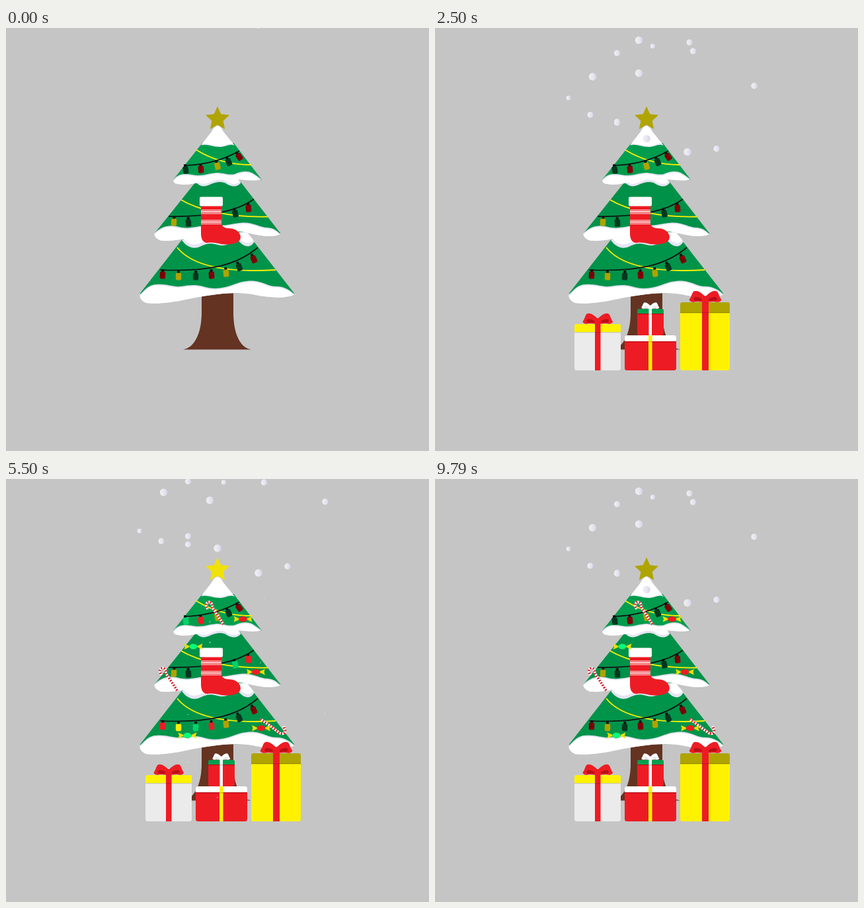
An HTML page with a canvas for the animation above (9870 ms loop, 640x640 px).

```html
<!DOCTYPE html>
<html lang="en">
<head>
<meta charset="utf-8">
<title>Christmas tree</title>
<style>
html, body { margin: 0; width: 100%; height: 100%; overflow: hidden; background: #c5c5c5; }
canvas { display: block; }
</style>
</head>
<body>
<canvas id="stage" width="640" height="640"></canvas>
<script>
const ctx = document.getElementById('stage').getContext('2d');
const LOOP = 9870, FPS = 14, LAST = 137;
const RED = '#ed1c24', DARK_RED = '#b90f16', YELLOW = '#fff200', OLIVE = '#b0a400';
const SHADE = '#e4e5f2';

// helpers
function fill(path, color) {
  ctx.fillStyle = color;
  ctx.fill(new Path2D(path));
}
function stroke(path, color, width, dash = []) {
  ctx.strokeStyle = color;
  ctx.lineWidth = width;
  ctx.setLineDash(dash);
  ctx.stroke(new Path2D(path));
  ctx.setLineDash([]);
}
function box(x, y, w, h, color, radius = 0) {
  ctx.fillStyle = color;
  ctx.beginPath();
  ctx.roundRect(x, y, w, h, radius);
  ctx.fill();
}
function at(x, y, draw, angle = 0) {
  ctx.save();
  ctx.translate(x, y);
  ctx.rotate(angle * Math.PI / 180);
  draw();
  ctx.restore();
}
function mix(a, b, k) {
  return `rgb(${a.map((v, i) => Math.round(v + (b[i] - v) * k)).join(',')})`;
}

// remaining share of a drop, slow start and long soft landing
function remaining(x) {
  if (x <= 0) return 1;
  if (x >= 1) return 0;
  let lo = 0, hi = 1;
  for (let i = 0; i < 24; i++) {
    const t = (lo + hi) / 2, u = 1 - t;
    if (1.5 * u * u * t + t * t * t < x) lo = t; else hi = t;
  }
  const u = 1 - lo;
  return u * u * (3 - 2 * u);
}

// brightness of the blinking lights: [second, level]
const GLOW = [[0, 0], [4, 0], [5.5, 1], [7, 0], [8.8, 1], [9.78, 0], [10, 0]];
function glowAt(s) {
  const i = GLOW.findIndex(k => k[0] > s);
  const [a, p] = GLOW[i - 1], [b, q] = GLOW[i];
  return p + (q - p) * (s - a) / (b - a);
}

// white snow with a shaded rim on the side given by the shift
function snow(path, shift) {
  fill(path, SHADE);
  ctx.save();
  ctx.clip(new Path2D(path));
  ctx.translate(0, shift);
  fill(path, '#fff');
  ctx.restore();
}

function tree() {
  fill('M296 396V430C296 464 284 484 268 486.500H371C355 484 344 464 344 430V396Z', '#643322');

  fill('M268 318L202.500 402Q320 400 436.500 402L371 318Z', '#00944a');
  snow('M266 321C274 332 284 335 293 331C303 326 309 325 320 328C334 332 344 322 352 322C358 329 368 336 376 323L362 306L280 310Z', -5);
  snow('M202 404C210 396 216 388 228 388C244 387 252 392 264 391C278 389 286 388 298 391C314 396 328 394 342 389C354 384 364 382 374 382.500C390 384 396 391 410 391C421 391 430 397 436.500 403C424 410 398 408 378 404C346 397 308 404 276 410C250 416 226 418 212 416C205 413 203 409 202 404Z', 2);

  fill('M288.500 231L224.500 311Q320 306 415.500 311L353.500 231Z', '#009148');
  snow('M287 233C292 239 298 241 306 238C318 233 326 231 334 236C342 241 350 241 355.500 234L348 225L294 226Z', -3.5);
  snow('M224 311C236 299 248 297 262 301C278 305 290 299 304 299C326 301 342 296 358 294.500C376 294 384 302 396 302C406 303 410 307 415.500 312C404 317 386 315 370 311C346 304 320 309 296 313C270 320 250 323 234 321.500C228 319 225 316 224 311Z', 2);

  fill('M297 174L253 229.500Q320 224 387 229.500L344.500 174Z', '#009b4c');
  fill('M296 177L278 200Q320 226 372 218L350 190Q320 205 296 177Z', '#00a04f');
  snow('M253 230C260 220 270 220 282 222C296 225 306 220 318 219C330 219 336 223 346 221C356 216 366 216 372 219C378 222 382 226 386.500 229C374 232 360 230 346 228C322 225 304 232 286 235C272 238 262 237 256 235Q253 233 253 230Z', 2);
  snow('M311 157Q320 139 329 157L346 178C338 174 333 180 323 180C312 180 305 175 295 177.500Z', -1.5);
}

function garlands() {
  stroke('M288 184.500C310 198 335 207 371 207', YELLOW, 1.8);
  stroke('M270 208C302 207 330 199 353 186', '#111', 1.7);
  stroke('M265 260C290 275 338 287 396 285.500', YELLOW, 1.8);
  stroke('M246 285C300 286 346 280 375 259', '#111', 1.7);
  stroke('M259 332C280 358 325 371 408 366', YELLOW, 1.8);
  stroke('M233 366C305 369 348 360 381 332', '#111', 1.7);
}

const LIGHT = {
  r: [[124, 0, 8], [237, 28, 36]],
  g: [[0, 56, 30], [0, 212, 106]],
  y: [[176, 162, 0], [255, 236, 0]]
};
// kind, x, y, tilt, blinks
const BULBS = [
  ['g', 272, 215, -8, 1], ['r', 295, 214, -5, 1], ['y', 320, 209, -14, 0], ['g', 337, 203, -24, 0], ['r', 353, 195, -34, 0],
  ['y', 254, 294, 3, 0], ['g', 276, 295, -3, 0], ['g', 347, 281, -14, 1], ['r', 367, 273, -6, 1],
  ['r', 237, 374, 2, 1], ['y', 261, 376, 0, 1], ['g', 287, 376, 2, 1], ['r', 311, 374, -4, 1],
  ['y', 333, 371, -6, 0], ['g', 353, 362, -22, 0], ['r', 375, 350, -24, 0]
];
function bulbs(glow) {
  for (const [kind, x, y, tilt, blinks] of BULBS) {
    at(x, y, () => {
      box(-2, -9, 4, 5, '#111', 1);
      box(-4.2, -5.5, 8.4, 11, mix(...LIGHT[kind], blinks * glow), 2);
    }, tilt);
  }
}

function stocking() {
  fill('M295 266H326V296C327 303 335 303 342 303.500C350 305 355 311 355 317C354 326 341 328.500 326 327C318 325 312 324 305 325C297 325 295 318 295 310Z', RED);
  for (const y of [275, 290.5]) {
    box(295, y, 31, 1, '#fff');
    box(295, y + 2.2, 31, 1.8, '#fff');
    box(295, y + 5.3, 31, 1, '#fff');
  }
  box(293, 255.5, 35, 14, '#fff', 2);
}

function bow(cx, base, w, h, color, dark) {
  for (const side of [-1, 1]) {
    at(cx, base, () => {
      ctx.scale(side * w / 2, h);
      fill('M0 -.5C.2 -.8 .5 -1.150 .72 -.97C.84 -.8 .84 -.52 1 -.22C.9 0 .76 0 .62 -.04C.4 -.1 .2 0 0 0Z', color);
      fill('M.2 -.3C.42 -.46 .6 -.54 .7 -.4C.76 -.28 .7 -.16 .6 -.14C.45 -.18 .32 -.16 .2 -.12Z', dark);
    });
  }
  box(cx - w * .11, base - h * .56, w * .22, h * .56, color, 2);
}

function gift(g, drop) {
  at(0, -g.fall * drop, () => {
    const cx = g.ribbonX + g.ribbonW / 2;
    box(g.x, g.y, g.w, g.bottom - g.y, g.body, 3.5);
    box(g.x, g.y, g.w, g.lidH, g.lid, [3, 3, 0, 0]);
    box(g.x, g.y + g.lidH, g.w, 1.3, g.edge);
    box(g.ribbonX, g.y, g.ribbonW, g.bottom - g.y, g.ribbon);
    box(g.ribbonX, g.y + g.lidH, g.ribbonW, 1.2, 'rgba(90,0,0,.25)');
    bow(cx, g.y, g.bowW, g.bowH, g.ribbon, g.fold);
  });
}
const GIFTS = [
  { x: 287, y: 465, w: 78, bottom: 518, lidH: 9, lid: '#fff', body: RED, edge: DARK_RED,
    ribbonX: 323, ribbonW: 5.5, ribbon: YELLOW, fold: '#e8d800', bowW: 39, bowH: 13, fall: 1200 },
  { x: 306, y: 425, w: 40, bottom: 465, lidH: 7, lid: '#009f4e', body: RED, edge: DARK_RED,
    ribbonX: 323.5, ribbonW: 4.5, ribbon: '#fff', fold: '#e6e6ee', bowW: 27, bowH: 9.5, fall: 900 },
  { x: 211, y: 448, w: 70, bottom: 518, lidH: 12, lid: YELLOW, body: '#ebebeb', edge: '#c9c9b4',
    ribbonX: 242, ribbonW: 8.5, ribbon: RED, fold: DARK_RED, bowW: 46, bowH: 16, fall: 900 },
  { x: 371, y: 415, w: 75, bottom: 518, lidH: 15, lid: OLIVE, body: YELLOW, edge: '#91870a',
    ribbonX: 404, ribbonW: 10, ribbon: RED, fold: DARK_RED, bowW: 49, bowH: 17, fall: 600 }
];

function cane(path) {
  stroke(path, '#fff', 3.8);
  stroke(path, '#d8202a', 3.8, [2, 2.2]);
}
function candy(x, y, color) {
  at(x, y, () => {
    fill('M-4 0L-14 -4.500L-12.500 0L-14 4.500ZM4 0L14 -4.500L12.500 0L14 4.500Z', '#eadf00');
    ctx.fillStyle = color;
    ctx.beginPath();
    ctx.ellipse(0, 0, 6.2, 4.2, 0, 0, 7);
    ctx.fill();
    ctx.strokeStyle = 'rgba(120,110,0,.45)';
    ctx.lineWidth = .8;
    ctx.stroke();
  });
}
function sweets(drop) {
  at(0, -1200 * drop, () => {
    const hooked = 'M329 220L312 194C313 184 302 184 303 192L305 197';
    cane(hooked);
    at(-70, 100, () => cane(hooked));
    cane('M385 363L411 382C417 388 425 385 421.500 378L420 374');
    for (const [x, y] of [[358.5, 212], [378, 292], [386, 377]]) candy(x, y, RED);
    for (const [x, y] of [[283.5, 253.5], [274.5, 388]]) candy(x, y, '#00ff7f');
  });
}

function star(glow) {
  ctx.fillStyle = mix([176, 164, 0], [240, 226, 8], glow);
  ctx.beginPath();
  for (let i = 0; i < 10; i++) {
    const r = i % 2 ? 9 : 19, a = i * Math.PI / 5;
    ctx.lineTo(320 + r * Math.sin(a), 137.6 - r * Math.cos(a));
  }
  ctx.fill();
}

// x, height at age 46, speed per step, radius
const FLAKES = [
  [202, 142, 3.3, 3.4], [235, 181, 4.52, 4.5], [275.5, 199, 5.2, 4.5], [275.5, 219, 6.88, 4.5],
  [382, 248, 5.5, 5.7], [426, 250, 6.12, 4.6], [320, 251, 7.6, 5.7], [308.5, 116.5, 4.38, 5.7],
  [238.5, 145, 6.48, 5.7], [483, 158.5, 6.45, 4.7], [329.5, 57.5, 2.73, 3.6], [390.5, 74.5, 3.6, 4.6],
  [385, 90, 6.2, 4.6], [275.5, 84, 4.18, 4.6], [308.5, 71.5, 4.82, 5.7], [322.5, -78, 4, 4]
];
const WAVES = [0, 50.25, 102];
function snowfall(frame) {
  for (const start of WAVES) {
    const age = frame - start;
    if (age < 0 || age >= 82) continue;
    const scale = Math.min(1, (82 - age) / 35);
    for (const [x, y46, speed, radius] of FLAKES) {
      const r = radius * scale, y = y46 + (age - 46) * speed - (radius - r);
      const tint = ctx.createLinearGradient(x - r, 0, x + r, 0);
      tint.addColorStop(0, '#f0f0f2');
      tint.addColorStop(.55, '#e6e6ee');
      tint.addColorStop(1, '#d3d3ec');
      ctx.fillStyle = tint;
      ctx.beginPath();
      ctx.arc(x, y, r, 0, 7);
      ctx.fill();
    }
  }
}

function render(now) {
  const frame = Math.min(LAST, Math.floor((now % LOOP) * FPS / 1000 + .1));
  const glow = glowAt(frame / FPS);
  box(0, 0, 640, 640, '#c5c5c5');
  tree();
  garlands();
  bulbs(glow);
  stocking();
  const drop = remaining(frame / 29);
  for (const g of GIFTS) gift(g, drop);
  sweets(remaining((frame - 28.4) / 29));
  star(glow);
  snowfall(frame);
  requestAnimationFrame(render);
}
render(0);
</script>
</body>
</html>
```
